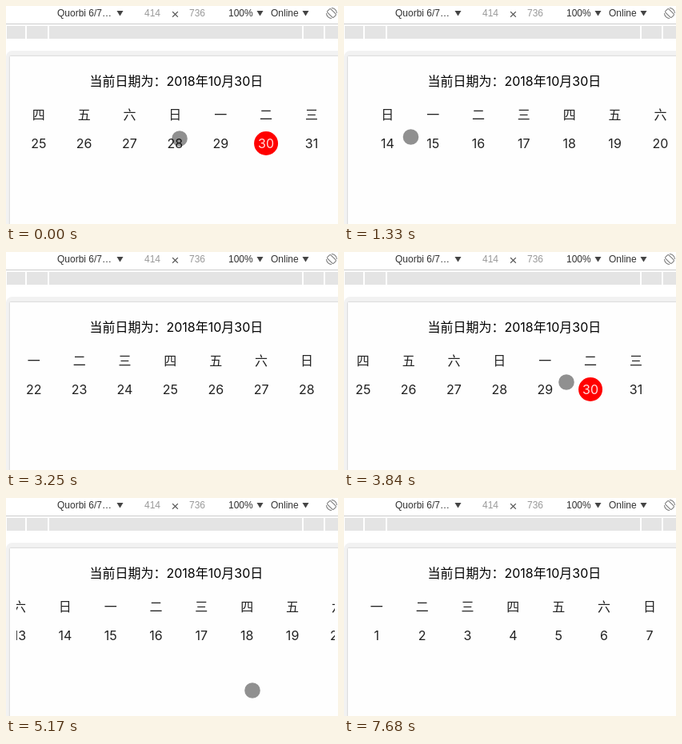
Recreate the animation shown at these times as an HTML page with a canvas. Size 415 by 273 pixels, loop 8290 ms.

```html
<!DOCTYPE html>
<html lang="zh">
<head>
<meta charset="utf-8">
<style>
  html, body { margin: 0; width: 100%; height: 100%; overflow: hidden; background: #fff; }
  canvas { display: block; width: 415px; height: 273px; }
</style>
</head>
<body>
<canvas></canvas>
<script>
const W = 415, H = 273, LOOP = 8290, TICK = 147.7;
const PITCH = 398 / 7, FIRST_X = 40.8, FIRST_DAY = 25;
const UI_FONT = '"Liberation Sans", sans-serif';
const PAGE_FONT = 'Inter, "Noto Sans CJK SC", "Noto Sans CJK", sans-serif';
const WEEK = '日一二三四五六';

// The strip follows the finger while held, then eases to day `to`. Times are in ticks.
const swipes = [
  { at: 0, hold: 2, settle: 6, x: 217, y: 166, vx: 57, vy: 0, to: 14 },
  { at: 8, hold: 1, settle: 2, x: 70, y: 164, vx: 13.5, vy: 0, to: 14 },
  { at: 12, hold: 6, settle: 2, x: 167, y: 149, vx: 1, vy: 0, to: 14 },
  { at: 20, hold: 1, settle: 3, x: 200, y: 152, vx: -70, vy: 4, to: 25 },
  { at: 25, hold: 1, settle: 1, x: 295, y: 163, vx: -17, vy: 0, to: 25 },
  { at: 27, hold: 2, settle: 3, x: 286, y: 160, vx: 52, vy: -12, to: 14 },
  { at: 33, hold: 3, settle: 5, x: 275, y: 241, vx: 16.5, vy: 0, to: 5 },
  { at: 41, hold: 3, settle: 2, x: 219, y: 187, vx: 10.5, vy: 1, to: 4 },
  { at: 47, hold: 2, settle: 3, x: 250, y: 247, vx: 63, vy: -1, to: 1 }
];

const canvas = document.querySelector('canvas');
const ctx = canvas.getContext('2d');
const dpr = window.devicePixelRatio || 1;
canvas.width = W * dpr;
canvas.height = H * dpr;
ctx.scale(dpr, dpr);

const easeOut = u => 1 - (1 - u) ** 3;

function stateAt(tick) {
  const i = swipes.findLastIndex(s => s.at <= tick);
  const { at, hold, settle, x, y, vx, vy, to } = swipes[i];
  const from = i ? swipes[i - 1].to : FIRST_DAY;
  const age = tick - at, held = Math.min(age, hold);
  const dragged = from - held * vx / PITCH;
  const u = Math.min((age - held) / settle, 1);
  return {
    day: dragged + (to - dragged) * easeOut(u),
    finger: age <= hold ? [x + age * vx, y + age * vy] : null
  };
}

function rect(x, y, w, h, color) {
  ctx.fillStyle = color;
  ctx.fillRect(x, y, w, h);
}

function disc(x, y, r, color) {
  ctx.fillStyle = color;
  ctx.beginPath();
  ctx.arc(x, y, r, 0, Math.PI * 2);
  ctx.fill();
}

function text(str, x, y, color, font, align = 'left') {
  ctx.font = font;
  ctx.textAlign = align;
  ctx.fillStyle = color;
  ctx.fillText(str, x, y);
}

const label = (str, x, color = '#333') => text(str, x, 13, color, `12px ${UI_FONT}`);
const pageText = (str, x, y, color, align) => text(str, x, y, color, `16px ${PAGE_FONT}`, align);

function arrow(x) {
  ctx.fillStyle = '#444';
  ctx.beginPath();
  ctx.moveTo(x - 4, 6);
  ctx.lineTo(x + 4, 6);
  ctx.lineTo(x, 12.5);
  ctx.fill();
}

function drawRotateIcon() {
  ctx.save();
  ctx.translate(407, 9);
  ctx.rotate(-Math.PI / 4);
  ctx.strokeStyle = '#777';
  ctx.beginPath();
  ctx.roundRect(-3, -5.5, 6, 11, 1.5);
  for (const a of [0, Math.PI]) {
    ctx.moveTo(6.5 * Math.cos(a - 0.8), 6.5 * Math.sin(a - 0.8));
    ctx.arc(0, 0, 6.5, a - 0.8, a + 0.8);
  }
  ctx.stroke();
  ctx.restore();
}

function drawToolbar() {
  label('Quorbi 6/7…', 64);
  label('414', 173, '#999');
  text('×', 211.5, 16, '#555', `17px ${UI_FONT}`, 'center');
  label('736', 229, '#999');
  label('100%', 278);
  label('Online', 331);
  [142.5, 317.5, 374.5].forEach(arrow);
  drawRotateIcon();

  rect(0, 22, W, 1, '#ccc');
  rect(1, 25, W, 16, '#e4e4e4');
  for (const x of [24, 52, 370, 397]) rect(x, 25, 2, 16, '#fff');
}

function drawPage() {
  ctx.fillStyle = '#f2f2f2';
  ctx.beginPath();
  ctx.roundRect(0, 56, W + 20, H, 8);
  ctx.fill();
  ctx.save();
  ctx.shadowColor = 'rgba(0,0,0,.25)';
  ctx.shadowBlur = 2 * dpr;
  rect(5, 63, W, H, '#fefefe');
  ctx.restore();
  pageText('当前日期为：2018年10月30日', 104.5, 100, '#000');
}

function drawDays(first) {
  ctx.save();
  ctx.beginPath();
  ctx.rect(13, 120, 398, 75);
  ctx.clip();
  for (let day = 1; day <= 31; day++) {
    const x = FIRST_X + (day - first) * PITCH;
    const today = day === 30;
    if (today) disc(x, 172, 15, '#f00');
    pageText(WEEK[day % 7], x, 142, '#222', 'center');
    pageText(day, x, 178, today ? '#fdd' : '#222', 'center');
  }
  ctx.restore();
}

function draw(ms) {
  const { day, finger } = stateAt(Math.floor((ms % LOOP + 4) / TICK));
  rect(0, 0, W, H, '#fff');
  drawToolbar();
  drawPage();
  drawDays(day);
  if (finger) disc(...finger, 9.8, 'rgba(0,0,0,.43)');
}

let start;
function frame(now) {
  start ??= now;
  draw(now - start);
  requestAnimationFrame(frame);
}
draw(0);
requestAnimationFrame(frame);
</script>
</body>
</html>
```
